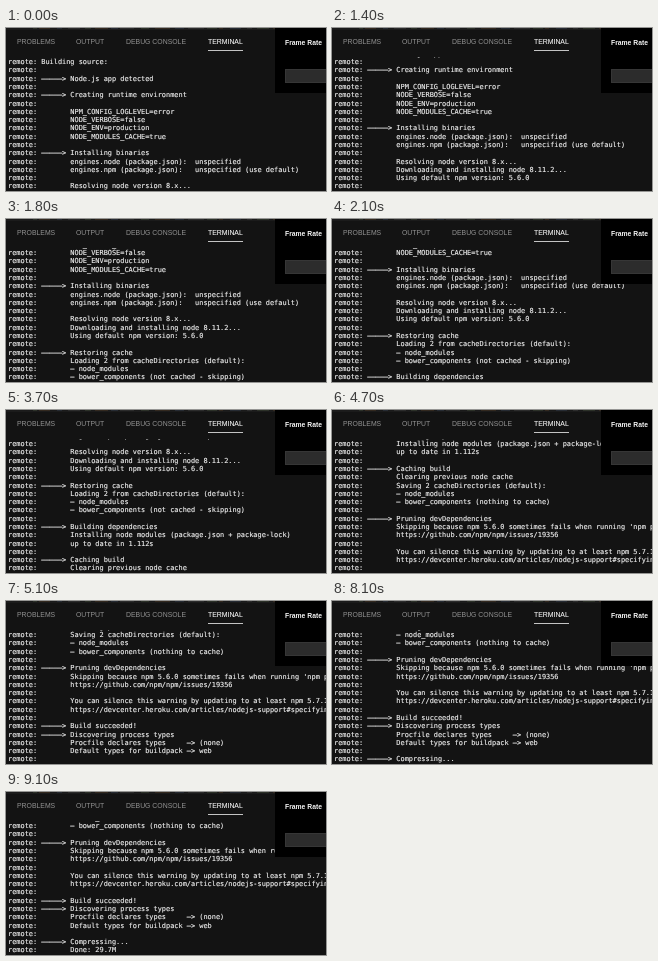
These frames come from a looping animation (320 px wide and 163 px high, 9600 ms). An HTML page:

```html
<!DOCTYPE html>
<html lang="en">
<head>
<meta charset="utf-8">
<title>Build log</title>
<style>
  html, body { margin: 0; width: 100%; height: 100%; overflow: hidden; background: #131313; }
  svg { display: block; width: 100vw; height: 100vh; }
  text { white-space: pre; }
  .log { font: 6.92px "DejaVu Sans Mono", monospace; fill: #f0f0f0; stroke: #f0f0f0; stroke-width: .15px; }
  .tab { font: 6.88px "Liberation Sans", sans-serif; fill: #929292; }
  .tab.on { fill: #f4f4f4; stroke: #f4f4f4; stroke-width: .1px; }
  .title { font: bold 6.8px "Liberation Sans", sans-serif; fill: #f4f4f4; }
</style>
</head>
<body>
<svg viewBox="0 0 320 163" preserveAspectRatio="none">
  <clipPath id="view"><rect y="29" width="320" height="134"/></clipPath>
  <rect width="320" height="163" fill="#131313"/>
  <g id="editor"><rect width="320" height="2" fill="#1b1b1b"/></g>
  <g id="tabs"></g>
  <rect x="202" y="22" width="35" height="1" fill="#c4c4c4"/>
  <g clip-path="url(#view)"><g id="log" class="log"></g></g>
  <g>
    <rect x="269" width="51" height="65" fill="#000"/>
    <text class="title" x="279" y="17">Frame Rate</text>
    <rect x="279.5" y="41.5" width="45" height="13" fill="#2c2c2c" stroke="#363636"/>
  </g>
</svg>
<script>
const LOOP = 9600, PITCH = 8.29, FIRST_BASELINE = 36.1;

// ">" marks a heading, a leading space marks a line indented under it
const lines = `Building source:

>Node.js app detected

>Creating runtime environment

 NPM_CONFIG_LOGLEVEL=error
 NODE_VERBOSE=false
 NODE_ENV=production
 NODE_MODULES_CACHE=true

>Installing binaries
 engines.node (package.json):  unspecified
 engines.npm (package.json):   unspecified (use default)

 Resolving node version 8.x...
 Downloading and installing node 8.11.2...
 Using default npm version: 5.6.0

>Restoring cache
 Loading 2 from cacheDirectories (default):
 – node_modules
 – bower_components (not cached - skipping)

>Building dependencies
 Installing node modules (package.json + package-lock)
 up to date in 1.112s

>Caching build
 Clearing previous node cache
 Saving 2 cacheDirectories (default):
 – node_modules
 – bower_components (nothing to cache)

>Pruning devDependencies
 Skipping because npm 5.6.0 sometimes fails when running 'npm prune'
 https://github.com/npm/npm/issues/19356

 You can silence this warning by updating to at least npm 5.7.1
 https://devcenter.heroku.com/articles/nodejs-support#specifying-a-version

>Build succeeded!
>Discovering process types
 Procfile declares types     –> (none)
 Default types for buildpack –> web

>Compressing...
 Done: 29.7M`.split("\n");

// [time in ms, index of the top visible line]
const scroll = [
  [0, 0], [1000, 1], [1400, 3], [1600, 5], [1800, 7], [2100, 9], [3700, 14],
  [4200, 16], [4600, 19], [4700, 25], [5100, 30], [8100, 31], [9100, 32], [LOOP, 32]
];

const byId = id => document.getElementById(id);

function add(parent, tag, attrs, content = "") {
  const el = document.createElementNS("http://www.w3.org/2000/svg", tag);
  for (const name in attrs) el.setAttribute(name, attrs[name]);
  el.textContent = content;
  parent.append(el);
}

function logText(line) {
  if (line[0] === ">") return "remote: —————> " + line.slice(1);
  if (line[0] === " ") return "remote:        " + line.slice(1);
  return "remote: " + line;
}

lines.forEach((line, i) =>
  add(byId("log"), "text", { x: 2, y: FIRST_BASELINE + i * PITCH }, logText(line)));

[["PROBLEMS", 11], ["OUTPUT", 70], ["DEBUG CONSOLE", 120], ["TERMINAL", 202]].forEach(([name, x]) =>
  add(byId("tabs"), "text", { x, y: 15.8, class: name === "TERMINAL" ? "tab on" : "tab" }, name));

// sliver of code at the lower edge of the editor
const inks = ["#2c3128", "#33291f", "#262b33", "#2c2c2c"];
for (let x = 27, i = 0; x < 269; i++) {
  const width = 4 + (i * 7) % 13;
  add(byId("editor"), "rect", { x, y: 0, width, height: 1, fill: inks[i % 4] });
  x += width + 2 + (i * 5) % 6;
}

byId("log").animate(scroll.map(([time, top]) => ({
  offset: time / LOOP,
  transform: `translateY(${-top * PITCH}px)`,
  easing: "steps(1, end)"
})), { duration: LOOP, iterations: Infinity });
</script>
</body>
</html>
```
